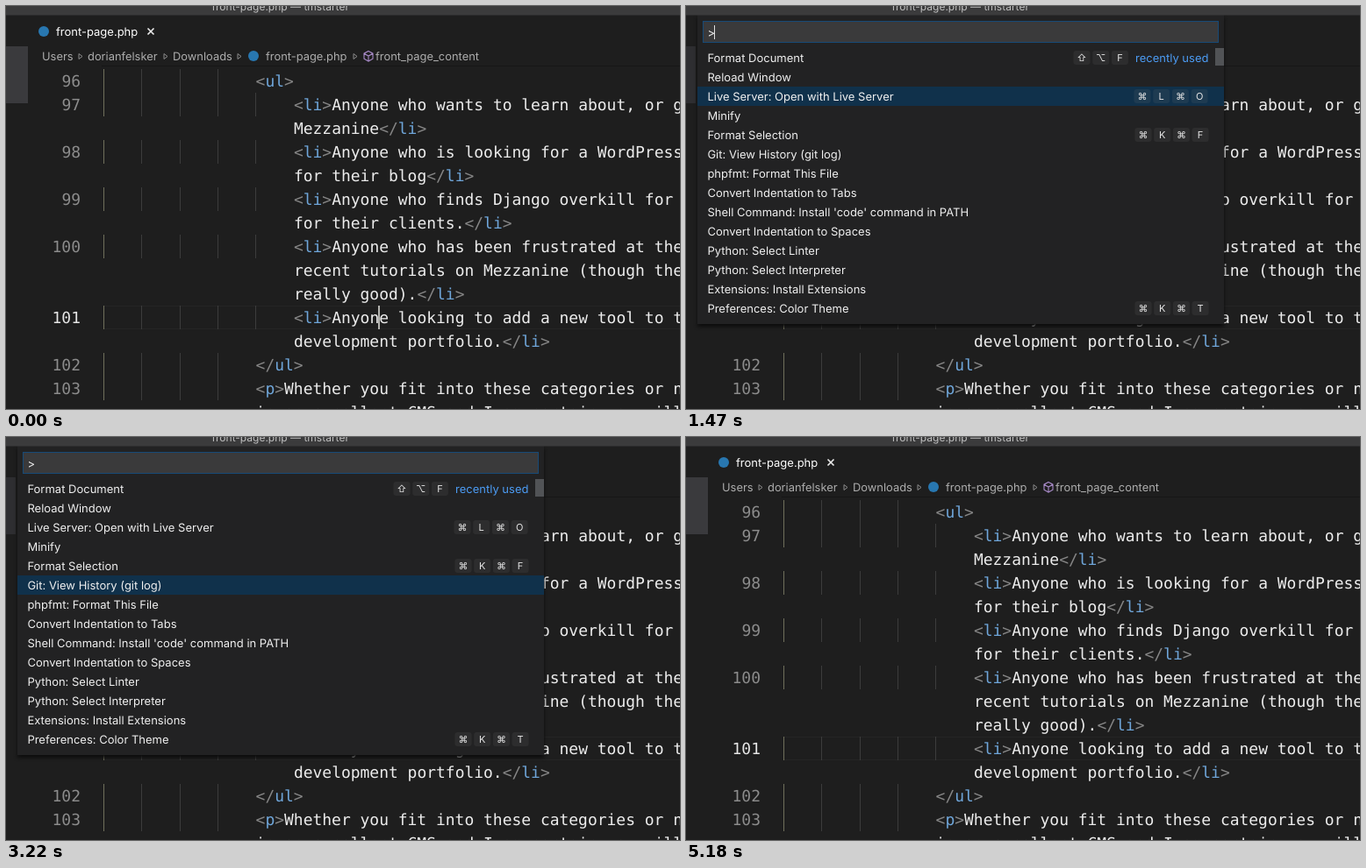
Animation of 768 by 460 pixels, one loop 5250 ms. Source, as an HTML page:

```html
<!DOCTYPE html>
<html lang="en">
<head>
<meta charset="utf-8">
<title>Command palette</title>
<style>
  html, body { margin: 0; width: 100%; height: 100%; overflow: hidden; background: #1e1e1e; }
  svg { display: block; width: 768px; height: 460px; }
  text { font: 13px Inter, "Liberation Sans", sans-serif; text-rendering: geometricPrecision; white-space: pre; }
  .code { font: 17.97px "DejaVu Sans Mono", "Liberation Mono", monospace; fill: #ececec; }
  .num { fill: #8c8c8c; text-anchor: end; }
  .active { fill: #e6e6e6; }
  .punct { fill: #868686; }
  .tag { fill: #6fa6da; }
  .crumb { fill: #adadad; font-size: 12.9px; }
  .row { fill: #f0f0f0; }
  .key { font-size: 11px; fill: #e6e6e6; text-anchor: middle; }
  .panel { filter: drop-shadow(0 3px 2px #0c0c0c); }
</style>
</head>
<body>
<svg id="stage" viewBox="0 0 768 460"></svg>
<script>
const LOOP = 5250, STEP = 70;
const OPEN = 235, CLOSE = 4620, BLINK = 500;
const ORIGIN = 111, CHAR = 10.82, LINE = 27, ROW = 22;
// [time, selected row]
const PICKS = [[0, 0], [1190, 1], [1400, 2], [1750, 3], [1960, 4], [2170, 5]];

// [line number, indent in characters, markup]
const CODE = [
  [96, 16, "<ul>"],
  [97, 20, "<li>Anyone who wants to learn about, or get"],
  [0, 20, "Mezzanine</li>"],
  [98, 20, "<li>Anyone who is looking for a WordPress"],
  [0, 20, "for their blog</li>"],
  [99, 20, "<li>Anyone who finds Django overkill for"],
  [0, 20, "for their clients.</li>"],
  [100, 20, "<li>Anyone who has been frustrated at the"],
  [0, 20, "recent tutorials on Mezzanine (though the"],
  [0, 20, "really good).</li>"],
  [101, 20, "<li>Anyone looking to add a new tool to the"],
  [0, 20, "development portfolio.</li>"],
  [102, 16, "</ul>"],
  [103, 16, "<p>Whether you fit into these categories or not"],
  [0, 16, "is an excellent CMS and I am certain you will"]
];

// [label, shortcut keys, centre of first key]
const COMMANDS = [
  ["Format Document", "⇧⌥F", 451],
  ["Reload Window"],
  ["Live Server: Open with Live Server", "⌘L⌘O", 520],
  ["Minify"],
  ["Format Selection", "⌘K⌘F", 521],
  ["Git: View History (git log)"],
  ["phpfmt: Format This File"],
  ["Convert Indentation to Tabs"],
  ["Shell Command: Install 'code' command in PATH"],
  ["Convert Indentation to Spaces"],
  ["Python: Select Linter"],
  ["Python: Select Interpreter"],
  ["Extensions: Install Extensions"],
  ["Preferences: Color Theme", "⌘K⌘T", 521]
];

const stage = document.getElementById("stage");

function add(parent, name, attrs, content) {
  const node = document.createElementNS("http://www.w3.org/2000/svg", name);
  for (const key in attrs) node.setAttribute(key, attrs[key]);
  if (content !== undefined) node.textContent = content;
  parent.appendChild(node);
  return node;
}
const rect = (parent, x, y, width, height, fill, more) =>
  add(parent, "rect", { x, y, width, height, fill, ...more });
const label = (parent, x, y, content, cls, more) =>
  add(parent, "text", { x, y, class: cls, ...more }, content);
const path = (parent, d, stroke, width = 1) =>
  add(parent, "path", { d, stroke, "stroke-width": width, fill: "none" });
const dot = (parent, cx, cy) => add(parent, "circle", { cx, cy, r: 6, fill: "#2877b0" });

function drawCode(parent) {
  const top = 72.5;
  rect(parent, ORIGIN, 342, 657, 1, "#252525");
  rect(parent, ORIGIN, 368, 657, 1, "#252525");
  CODE.forEach(([num, indent, markup], i) => {
    const y = top + i * LINE, base = y + 19.5;
    if (num) {
      label(parent, 85, base, num, "code num" + (num === 101 ? " active" : ""));
      for (let col = 0; col < indent; col += 4) {
        rect(parent, Math.round(ORIGIN + col * CHAR), y - 0.5, 1, LINE, col ? "#3c3c3c" : "#70705c");
      }
    }
    const line = label(parent, ORIGIN + indent * CHAR + 0.5, base, undefined, "code");
    for (const part of markup.split(/(<\/?|>)/)) {
      const cls = /^[<>]/.test(part) ? "punct" : /^(ul|li|p)$/.test(part) ? "tag" : "";
      if (part) add(line, "tspan", { class: cls }, part);
    }
  });
}

function drawHeader(parent) {
  rect(parent, 0, 10, 768, 59, "#1e1e1e");
  rect(parent, 109, 68, 659, 1, "#161616");
  dot(parent, 43, 29);
  label(parent, 57, 34, "front-page.php", "", { fill: "#fff" });
  path(parent, "M161.5 25.5l7 7m0-7l-7 7", "#eee", 1.6);
  const crumbs = [[41, "Users"], [93, "dorianfelsker"], [190, "Downloads"],
    [296, "front-page.php"], [421, "front_page_content"]];
  for (const [x, name] of crumbs) label(parent, x, 62, name, "crumb");
  for (const x of [83, 180, 264, 396]) path(parent, `M${x} 54.5l4 3-4 3z`, "#8c8c8c");
  dot(parent, 282, 57);
  path(parent, "M413 51.5l5 2.7v6l-5 2.8-5-2.8v-6zM408 54.2l5 2.8 5-2.8M413 57v6", "#a98bc9", 1.1);
}

function drawPalette(parent) {
  rect(parent, 0, 46, 11, 65, "#2e2e31");
  rect(parent, 13, 10, 600, 353, "#222223", { class: "panel" });
  rect(parent, 19.5, 17.5, 587, 24, "#3a3a3b", { stroke: "#174a77" });
  label(parent, 24.4, 35, ">", "row");
  const bar = rect(parent, 13, 48, 600, ROW, "#10314b");
  rect(parent, 603, 48, 10, 20, "#8a8f94", { opacity: 0.45 });
  COMMANDS.forEach(([name, keys = "", first], i) => {
    const mid = 59 + i * ROW;
    label(parent, 24.4, mid + 4.7, name, "row");
    [...keys].forEach((key, k) => {
      const x = first + k * 21.7;
      rect(parent, x - 9.5, mid - 8, 19, 16, "#808080", { rx: 3, opacity: 0.12 });
      label(parent, x, mid + 4, key, "key");
    });
  });
  label(parent, 512, 63.7, "recently used", "", { fill: "#4c9cf4" });
  const caret = rect(parent, 32, 22, 1, 16, "#e0e0e0");
  return { bar, caret };
}

drawCode(add(stage, "g", {}));
const header = add(stage, "g", {});
drawHeader(header);
const side = rect(stage, 0, 46, 25, 65, "#3a3a3d");
const caret = rect(stage, 424, 342, 2, 27, "#b4b4b0");
const palette = add(stage, "g", {});
const { bar, caret: inputCaret } = drawPalette(palette);
rect(stage, 0, 0, 768, 10.5, "#3b3b3c");
label(stage, 234.6, 5, "front-page.php — tmstarter", "", { fill: "#c0c0c0", style: "font-size:12px" });

const show = (node, on) => node.setAttribute("visibility", on ? "inherit" : "hidden");
const lit = since => Math.floor(since / BLINK) % 2 === 0;

function draw(now) {
  const t = Math.floor((now % LOOP) / STEP) * STEP;
  const open = t >= OPEN && t < CLOSE;
  show(palette, open);
  show(side, !open);
  show(caret, !open && (t < OPEN || lit(t - CLOSE)));
  show(inputCaret, open && lit(t - OPEN));
  const pick = PICKS.filter(([at]) => at <= t).pop()[1];
  bar.setAttribute("y", 48 + pick * ROW);
}

const start = performance.now();
function tick() {
  draw(performance.now() - start);
  requestAnimationFrame(tick);
}
tick();
</script>
</body>
</html>
```
